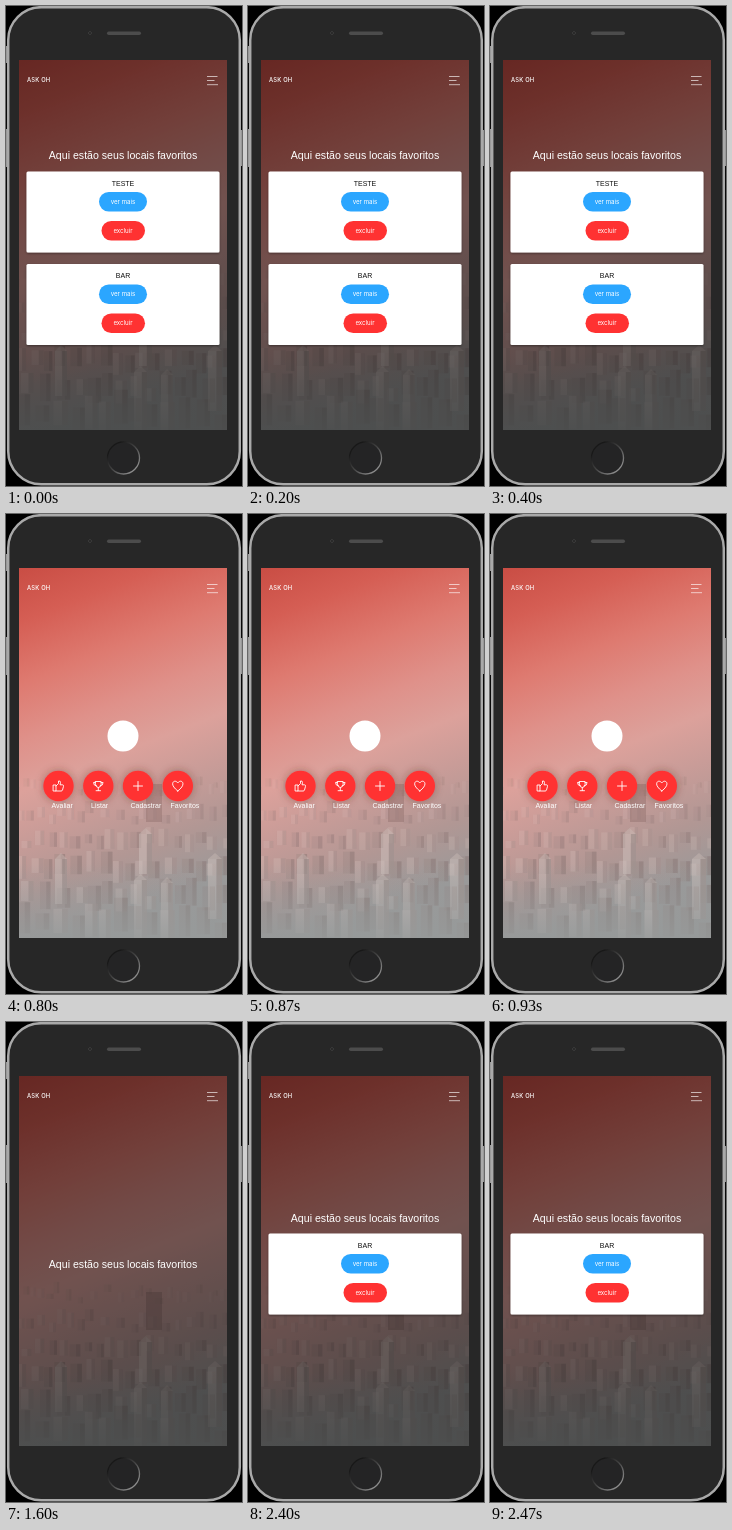
Write an HTML page that moves like this. It is 236x480 px and loops after 3190 ms.

```html
<!DOCTYPE html>
<html lang="pt">
<head>
<meta charset="utf-8">
<style>
  html, body { margin: 0; width: 100%; height: 100%; overflow: hidden; background: #000; }
  svg { display: block; width: 236px; height: 480px; }
  text { font-family: "Liberation Sans", Arial, sans-serif; font-size: 7px; }
  .ui { font-family: Inter, sans-serif; font-size: 6.2px; fill: #fff; }
  .brand { font-size: 5.8px; font-weight: 500; letter-spacing: .2px; }
  .mid { text-anchor: middle; }
  .icon { fill: none; stroke: #fff; stroke-width: .9; stroke-linejoin: round; stroke-linecap: round; }
</style>
</head>
<body>
<svg viewBox="0 0 236 480">
  <defs>
    <linearGradient id="sky" x2=".22" y2="1">
      <stop offset="0" stop-color="#c94d44"/>
      <stop offset=".14" stop-color="#d55e54"/>
      <stop offset=".3" stop-color="#de7a70"/>
      <stop offset=".45" stop-color="#df918a"/>
      <stop offset=".58" stop-color="#dca19b"/>
      <stop offset=".7" stop-color="#c99c98"/>
      <stop offset=".85" stop-color="#b19794"/>
      <stop offset="1" stop-color="#9a9999"/>
    </linearGradient>
    <linearGradient id="haze" x2="0" y2="1">
      <stop offset="0" stop-color="#969a9a" stop-opacity="0"/>
      <stop offset="1" stop-color="#969a9a" stop-opacity=".85"/>
    </linearGradient>
    <linearGradient id="ring" x2="1" y2="1">
      <stop offset=".2" stop-color="#181818"/>
      <stop offset=".5" stop-color="#444"/>
      <stop offset="1" stop-color="#aaa"/>
    </linearGradient>
    <filter id="shadow" x="-5%" y="-10%" width="110%" height="125%">
      <feDropShadow dx="0" dy="1" stdDeviation="1.2" flood-opacity=".4"/>
    </filter>
    <filter id="glow" x="-50%" y="-50%" width="200%" height="200%">
      <feDropShadow dx="0" dy="0" stdDeviation="4" flood-color="#5a2a26" flood-opacity=".45"/>
    </filter>
    <clipPath id="screen"><path d="M13 54h208v370H13z"/></clipPath>
  </defs>

  <!-- phone -->
  <path d="M0 40h2v17H0zM0 123h2v38H0zM234 124h2v36h-2z" fill="#999"/>
  <rect x="2.2" y="1.2" width="231.6" height="477" rx="33" fill="#272727" stroke="#a9a9a9" stroke-width="2.5"/>
  <circle cx="84" cy="27" r="1.4" fill="#191919" stroke="#555" stroke-width=".6"/>
  <rect x="101" y="25.5" width="34" height="3.4" rx="1.7" fill="#4c4c4c"/>
  <circle cx="117.5" cy="452" r="16" fill="#242425" stroke="url(#ring)" stroke-width="1.3"/>

  <g clip-path="url(#screen)">
    <path d="M13 54h208v370H13z" fill="url(#sky)"/>
    <g id="city"></g>
    <path d="M13 350h208v74H13z" fill="url(#haze)"/>
    <path id="shade" d="M13 54h208v370H13z" opacity=".49"/>
    <text class="ui brand" x="21" y="76.2">ASK OH</text>
    <path d="M201 70.5h10.5M201 74.5h7.5M201 78.7h11" stroke="#fff" stroke-width=".8" opacity=".8"/>

    <g id="home">
      <circle cx="117" cy="222" r="15.5" fill="#fff"/>
    </g>
    <g id="places">
      <text id="title" class="mid" x="117" style="font-size:10.6px" fill="#fff">Aqui estão seus locais favoritos</text>
      <g id="cards"></g>
    </g>
  </g>
</svg>
<script>
const $ = id => document.getElementById(id);
const LOOP = 3190;
const scenes = [
  { at: 0, title: 153.2, cards: [['TESTE', 165.5], ['BAR', 258]] },
  { at: 800, home: true },
  { at: 1600, title: 246.2, cards: [] },
  { at: 2400, title: 199.8, cards: [['BAR', 211.5]] }
];

let seed = 11;
const rand = (lo, hi) => {
  seed = (seed * 16807) % 2147483647;
  return lo + (hi - lo) * seed / 2147483647;
};

const block = (x, y, w, h, fill, alpha) =>
  `<rect x="${x}" y="${y}" width="${w}" height="${h}" fill="${fill}" opacity="${alpha}"/>`;

// Each row of buildings is nearer, larger and clearer than the last.
function skyline() {
  let out = '';
  for (let row = 0; row < 6; row++) {
    const base = 276 + row * 29;
    for (let x = rand(8, 16); x < 221;) {
      const w = rand(4, 8) + row * 1.4;
      const h = rand(5, 12) + row * rand(1, 5);
      const y = base - h + rand(-6, 6);
      const alpha = .08 + row * .05;
      out += block(x, y, w, h, rand(0, 1) < .5 ? '#dcc8c4' : '#917c79', alpha);
      out += block(x + w * .6, y, w * .4, h, '#75615e', alpha);
      x += w + rand(0, 7);
    }
  }
  out += block(140, 270, 16, 38, '#8a6a66', .4);
  const towers = [[49, 345, 12, 45], [133, 320, 13, 40], [128, 366, 13, 58], [155, 369, 12, 55], [202, 345, 14, 60]];
  for (const [x, y, w, h] of towers) {
    out += block(x, y, w, h, '#d2c5c2', .45) + block(x + w * .6, y, w * .4, h, '#7d6f6d', .4);
    out += `<path d="M${x} ${y}l${w / 2} -6 ${w / 2} 6z" fill="#cdbdba" opacity=".4"/>`;
  }
  return out;
}

const button = (label, x, y, w, fill) =>
  `<rect x="${x}" y="${y}" width="${w}" height="19.5" rx="9.75" fill="${fill}"/>
   <text class="ui mid" x="117" y="${y + 11.8}">${label}</text>`;

const card = ([name, y]) =>
  `<g transform="translate(0 ${y})">
    <rect x="20.5" width="193" height="81" rx="1.5" fill="#fff" filter="url(#shadow)"/>
    <text class="mid" x="117" y="14" fill="#111">${name}</text>
    ${button('ver mais', 93, 20.5, 48, '#2ba6ff')}
    ${button('excluir', 95.5, 49.5, 43.5, '#ff3232')}
  </g>`;

// Icons are drawn around the centre of their button.
const actions = [
  ['Avaliar', 52.5, 45.5, 'M-5-1h2.5v6H-5zM-2.5 0L0-2.5V-5q2-.5 2 1.5L1.5-1.2H4q1.3.2 1 1.5L4 4q-.3 1-1.3 1h-5.2'],
  ['Listar', 92.3, 85, 'M-2.8-4.5h5.6v3q-.5 3-2.8 3t-2.8-3zM-2.8-3.5h-2q0 3.2 3 3.5M2.8-3.5h2q0 3.2-3 3.5M0 1.5v3M-2.2 4.7h4.4'],
  ['Cadastrar', 132, 124.5, 'M-4.5 0h9M0-4.5v9'],
  ['Favoritos', 171.8, 164.5, 'M0 5C-8-1-5-5-2.6-4.8-1-4.7 0-3 0-3S1-4.7 2.6-4.8C5-5 8-1 0 5z']
];

$('city').innerHTML = skyline();
$('home').innerHTML += actions.map(([label, cx, tx, icon]) =>
  `<circle cx="${cx}" cy="272" r="15.2" fill="#ff3333" filter="url(#glow)"/>
   <path class="icon" transform="translate(${cx} 272)" d="${icon}"/>
   <text x="${tx}" y="294" fill="#fff">${label}</text>`).join('');

let shown;
function show(scene) {
  const hide = (id, off) => $(id).style.display = off ? 'none' : '';
  hide('home', !scene.home);
  hide('places', scene.home);
  hide('shade', scene.home);
  if (!scene.home) {
    $('title').setAttribute('y', scene.title);
    $('cards').innerHTML = scene.cards.map(card).join('');
  }
  shown = scene;
}

const start = performance.now();
function tick() {
  const t = (performance.now() - start) % LOOP;
  const scene = scenes.findLast(s => s.at <= t);
  if (scene !== shown) show(scene);
  requestAnimationFrame(tick);
}
tick();
</script>
</body>
</html>
```
